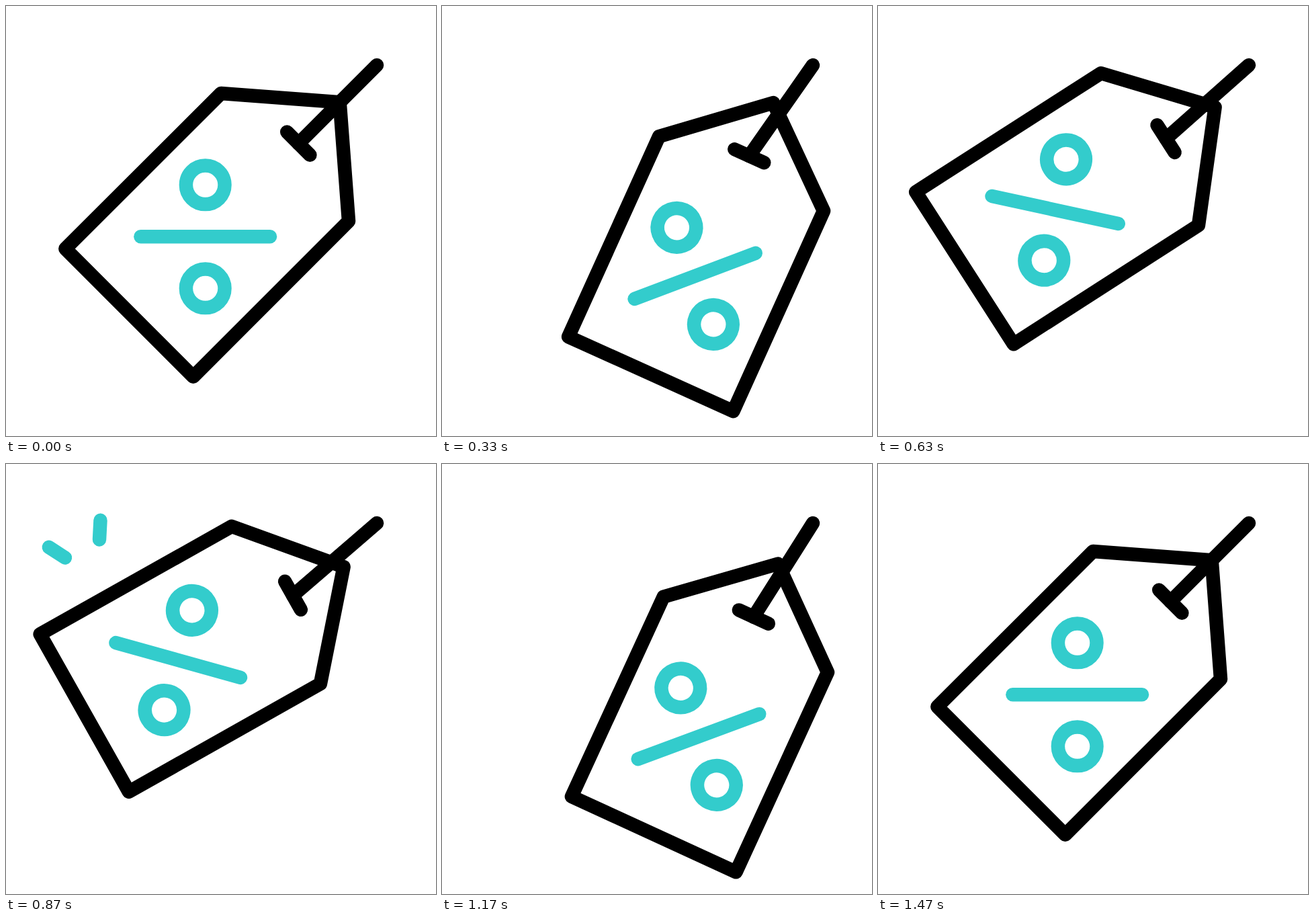
Recreate the animation shown at these times as an HTML page. Size 640 by 640 pixels, loop 2 s.

```html
<!DOCTYPE html>
<html lang="en">
<head>
<meta charset="utf-8">
<title>Swinging price tag</title>
<style>
  html, body { margin: 0; width: 100%; height: 100%; overflow: hidden; background: #fff; }
  svg { display: block; width: 100%; height: 100%; fill: none; stroke: #000; stroke-width: 20.5; stroke-linecap: round; stroke-linejoin: round; }
  .teal { stroke: #3cc; }
</style>
</head>
<body>
<svg viewBox="0 0 640 640">
  <g class="teal">
    <path class="spark" transform="translate(88 139.5) rotate(212.9)"/>
    <path class="spark" transform="translate(139 112.5) rotate(-87)"/>
  </g>
  <g id="swing">
    <path d="M552 88 435.3 204.7"/>
    <g id="tag">
      <path d="M320 130 496.7 143.3 510 320.3 278.7 551.7 88.3 361.3Z"/>
      <path d="M418.2 187.6 452.4 221.8"/>
      <g class="teal">
        <circle cx="296.7" cy="266.3" r="28.8"/>
        <path d="M200.4 343.3H393"/>
        <circle cx="296.7" cy="420.3" r="28.8"/>
      </g>
    </g>
  </g>
</svg>
<script>
const FPS = 30, FRAMES = 60;
const swing = document.getElementById('swing');
const tag = document.getElementById('tag');
const sparks = document.querySelectorAll('.spark');

// Turning points as [frame, value]; angles are in degrees.
const stringAngle = [[0, 0], [10.5, -10.5], [23.2, 10.3], [34.3, -13.7], [44, 0]];
const tagAngle = [[0, 0], [9.2, -20.7], [10, -20.7], [23.2, 21.3], [34.3, -20.6], [44, 0]];
const sparkLength = [[22, 0], [28.3, 40], [31.4, 40], [34.5, 0]];

const linear = t => t;
const easeInOut = t => t ** 1.7 / (t ** 1.7 + (1 - t) ** 1.7);

function track(keys, frame, ease) {
  const next = keys.findIndex(key => key[0] > frame);
  if (next <= 0) return keys.at(next)[1];
  const [[f0, v0], [f1, v1]] = [keys[next - 1], keys[next]];
  return v0 + (v1 - v0) * ease((frame - f0) / (f1 - f0));
}

function draw(ms) {
  const frame = Math.floor((ms + 3.4) * FPS / 1000) % FRAMES;
  const string = track(stringAngle, frame, linear);
  const twist = track(tagAngle, frame, easeInOut) - string;
  swing.setAttribute('transform', `rotate(${string} 552 88)`);
  tag.setAttribute('transform', `rotate(${twist} 435.3 204.7)`);

  const length = track(sparkLength, frame, easeInOut);
  for (const spark of sparks) spark.setAttribute('d', length > 0 ? `M0 0H${length}` : '');
}

const start = performance.now();
function tick() {
  draw(performance.now() - start);
  requestAnimationFrame(tick);
}
tick();
</script>
</body>
</html>
```
